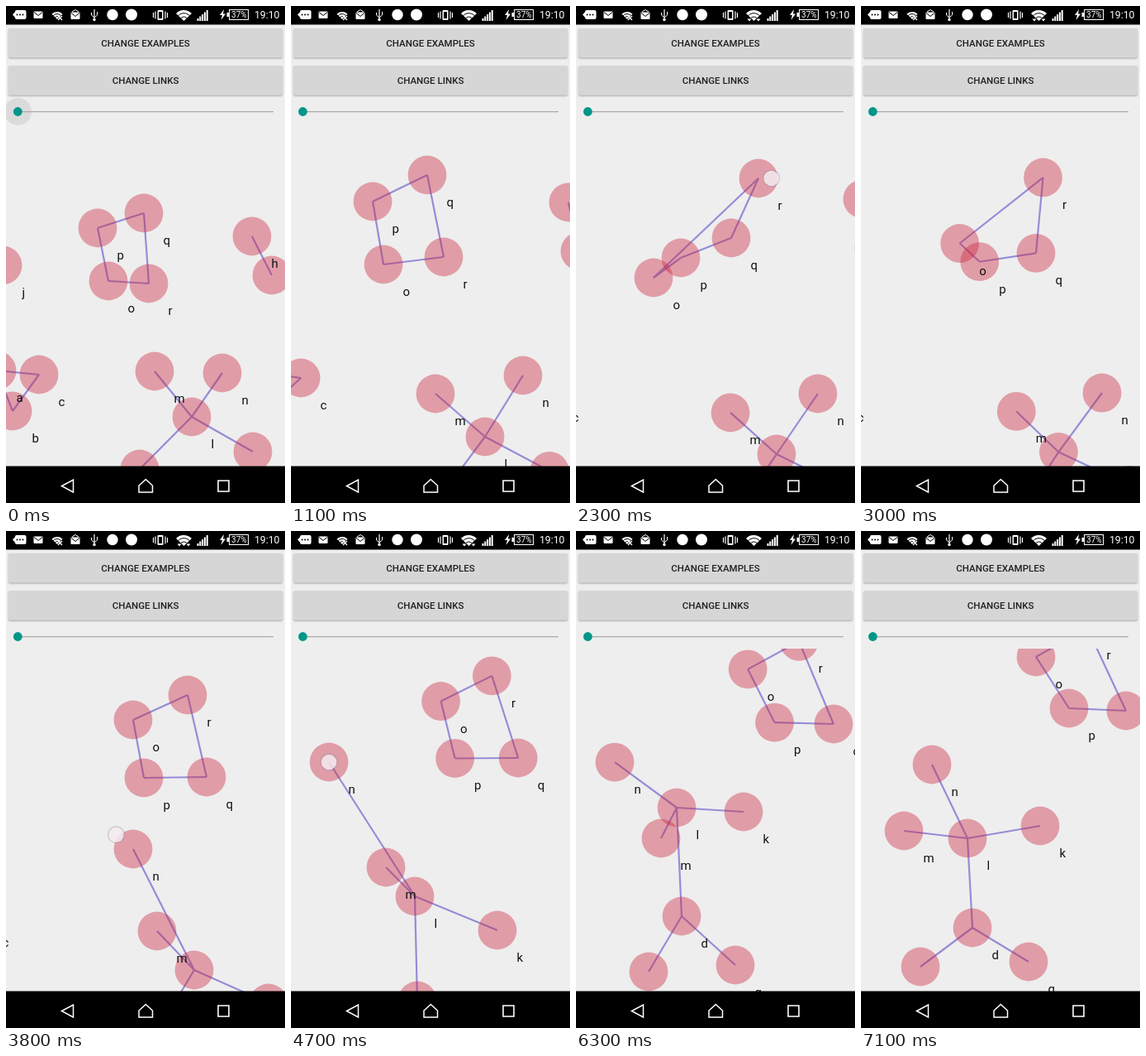
An HTML page with a canvas that plays this animation: 338x600 px, repeating every 7.2 s.

```html
<!DOCTYPE html>
<html lang="en">
<head>
<meta charset="utf-8">
<title>Linked nodes</title>
<style>
html, body { margin: 0; width: 100%; height: 100%; overflow: hidden; background: #eee; }
canvas { display: block; width: 338px; height: 600px; }
</style>
</head>
<body>
<canvas id="stage" width="338" height="600"></canvas>
<script>
const ctx = document.getElementById("stage").getContext("2d");
const LOOP = 7200, STEP = 100, RADIUS = 23.4;

// Smooth motion without overshoot through [time, x, y] keys, at rest outside them.
function path(...keys) {
  const last = keys.length - 1;
  const slope = (i, axis) => (keys[i + 1][axis] - keys[i][axis]) / (keys[i + 1][0] - keys[i][0]);
  const tangent = (i, axis) => {
    if (i === 0 || i === last) return slope(Math.min(i, last - 1), axis);
    const a = slope(i - 1, axis), b = slope(i, axis);
    return a * b > 0 ? 2 * a * b / (a + b) : 0;
  };
  return t => {
    if (t <= keys[0][0]) return keys[0].slice(1);
    if (t >= keys[last][0]) return keys[last].slice(1);
    const i = keys.findIndex(key => key[0] > t) - 1;
    const span = keys[i + 1][0] - keys[i][0];
    const u = (t - keys[i][0]) / span, v = 1 - u;
    return [1, 2].map(axis =>
      v * v * (1 + 2 * u) * keys[i][axis] + u * u * (3 - 2 * u) * keys[i + 1][axis]
      + span * u * v * (v * tangent(i, axis) - u * tangent(i + 1, axis)));
  };
}

// Motion of a part relative to the part that carries it.
const follow = (base, offset) => t => {
  const [x, y] = base(t), [dx, dy] = offset(t);
  return [x + dx, y + dy];
};

// The square drifts as a whole; its corners spread, get pulled over and settle mirrored.
const square = path([0, 144, 296], [1100, 140, 264], [2300, 157, 280], [3800, 196, 255],
  [4700, 225, 232], [6300, 258, 191], [7100, 265, 175]);
const corner = (start, spread, pulled, mirrored, end) => follow(square, path(
  [0, ...start], [1100, ...spread], [2300, ...pulled], [3800, ...mirrored], [7100, ...end]));

// The star is a hub with arms; its lower arm carries two more.
const hub = path([0, 225, 496], [1100, 235, 520], [2300, 243, 541], [3800, 228, 530],
  [4700, 150, 441], [6300, 122, 334], [7100, 129, 371]);
const lower = follow(hub, path([0, -63, 63], [1100, -50, 67], [3800, -42, 70],
  [4700, 3, 126], [6300, 6, 131], [7100, 6, 108]));

const right = path([0, 298, 278], [1100, 336, 237], [2300, 347, 233], [3300, 390, 235]);

const nodes = {
  o: corner([-20, 36], [-28, 48], [-63, 48], [-42, -27], [-53, -23]),
  p: corner([-33, -28], [-41, -28], [-30, 24], [-29, 43], [-13, 39]),
  q: corner([23, -46], [25, -60], [31, 0], [47, 42], [56, 42]),
  r: corner([29, 39], [45, 39], [64, -72], [24, -57], [9, -58]),
  l: hub,
  m: follow(hub, path([0, -45, -55], [1100, -60, -52], [3800, -45, -47],
    [4700, -35, -35], [6300, -19, 37], [7100, -77, -9])),
  k: follow(hub, path([0, 74, 42], [3800, 90, 40], [4700, 100, 41], [6300, 81, 5], [7100, 88, -15])),
  n: path([0, 262, 443], [1100, 281, 446], [2300, 293, 468], [3300, 291, 466],
    [3800, 154, 384], [4000, 46, 279], [6200, 46, 279], [7100, 86, 282]),
  d: lower,
  e: follow(lower, path([6300, -40, 67], [7100, -63, 47])),
  g: follow(lower, path([6300, 65, 59], [7100, 68, 41])),
  a: path([0, -11, 440], [1100, -70, 438]),
  b: path([0, 8, 489], [1100, -38, 495], [2300, -90, 500]),
  c: path([0, 40, 445], [1100, 12, 449], [2300, -28, 464], [4000, -28, 464], [4700, -46, 458]),
  j: path([0, -4, 313], [1100, -50, 310]),
  h: right,
  i: follow(right, path([0, 24, 47], [1100, 14, 59]))
};

const links = ["op", "pq", "qr", "ro", "lm", "ln", "lk", "ld", "de", "dg", "ab", "bc", "ca", "hi"];

// A finger runs slightly ahead of the node it drags.
const LEAD = 40;
const touches = [
  { node: "r", from: 1500, to: 2600, grip: 15 },
  { node: "n", from: 3300, to: 5500, grip: 0 }
];

function disc(x, y, r, color) {
  ctx.fillStyle = color;
  ctx.beginPath();
  ctx.arc(x, y, r, 0, 7);
  ctx.fill();
}

function box(x, y, w, h, color, r = 0) {
  ctx.fillStyle = color;
  ctx.beginPath();
  ctx.roundRect(x, y, w, h, r);
  ctx.fill();
}

function line(points, color, width, closed) {
  ctx.strokeStyle = color;
  ctx.lineWidth = width;
  ctx.beginPath();
  points.forEach(([x, y]) => ctx.lineTo(x, y));
  if (closed) ctx.closePath();
  ctx.stroke();
}

function shape(points, color) {
  ctx.fillStyle = color;
  ctx.beginPath();
  points.forEach(([x, y]) => ctx.lineTo(x, y));
  ctx.fill();
}

function text(value, x, y, font, color, align = "left") {
  ctx.font = font + " Roboto, sans-serif";
  ctx.fillStyle = color;
  ctx.textAlign = align;
  ctx.fillText(value, x, y);
}

function button(label, y) {
  ctx.save();
  ctx.shadowColor = "rgba(0,0,0,.3)";
  ctx.shadowBlur = 2;
  ctx.shadowOffsetY = 1;
  box(3, y, 332, 35.5, "#d6d6d6", 2);
  ctx.restore();
  text(label, 169, y + 22, "500 11.5px", "#202020", "center");
}

function wifi(x, y, r) {
  ctx.fillStyle = "#fff";
  ctx.beginPath();
  ctx.moveTo(x, y);
  ctx.arc(x, y, r, -Math.PI * .76, -Math.PI * .24);
  ctx.fill();
  for (const k of [.38, .72]) {
    ctx.strokeStyle = "#000";
    ctx.lineWidth = 1;
    ctx.beginPath();
    ctx.arc(x, y, r * k, -Math.PI * .8, -Math.PI * .2);
    ctx.stroke();
  }
}

function mail(x, y) {
  box(x - 5.5, y - 4, 11, 8.5, "#fff", 1);
  line([[x - 5, y - 3], [x, y + 1], [x + 5, y - 3]], "#000", 1);
}

function statusBar(t) {
  box(0, 0, 338, 22.5, "#000");
  box(11, 5, 13.5, 11, "#fff", 2);
  shape([[12, 6], [8, 10.5], [12, 15]], "#fff");
  for (const x of [13.5, 17, 20.5]) disc(x, 10.5, 1, "#000");
  mail(39, 10.5);
  wifi(62, 16, 9);
  line([[63, 12], [68, 17]], "#fff", 1.2);
  line([[68, 12], [63, 17]], "#fff", 1.2);
  mail(84, 11.5);
  line([[80, 7], [84, 4.5], [88, 7]], "#fff", 1);
  line([[107, 4], [107, 17]], "#fff", 1.2);
  line([[103.5, 8], [103.5, 11], [107, 14], [110.5, 11], [110.5, 7]], "#fff", 1);
  disc(107, 16.5, 1.7, "#fff");
  disc(129, 10.5, 6.7, "#fff");
  disc(152, 10.5, 7, "#fff");
  box(183.5, 5, 7, 12, "#fff", 1);
  box(185, 7, 4, 8, "#000");
  for (const side of [-1, 1]) {
    line([[187 + side * 6, 6.5], [187 + side * 6, 15.5]], "#fff", 1.2);
    line([[187 + side * 8.5, 8], [187 + side * 8.5, 14]], "#fff", 1.2);
  }
  wifi(215.5, 18, 13);
  if (t >= 1600 && t < 5300) {
    for (const x of [210, 221]) shape([[x - 2.5, 15.5], [x + 2.5, 15.5], [x, 18.5]], "#fff");
  }
  for (let i = 0; i < 5; i++) box(231.5 + i * 2.8, 15 - i * 2.5, 2, 3 + i * 2.5, "#fff");
  shape([[264, 4], [259, 11], [262, 11], [260.5, 17], [266, 9.5], [263, 9.5]], "#fff");
  ctx.strokeStyle = "#fff";
  ctx.lineWidth = 1;
  ctx.strokeRect(270.5, 4.5, 23, 12);
  box(267.5, 8, 3, 5, "#fff");
  text("37%", 282.3, 14.3, "10px", "#fff", "center");
  text("19:10", 331.5, 15, "12.3px", "#fff", "right");
}

function navBar() {
  box(0, 555.5, 338, 45, "#000");
  line([[67.5, 579.5], [81.5, 572], [81.5, 587]], "#fff", 1.5, true);
  line([[161, 579], [169.3, 571.5], [177.5, 579], [177.5, 587], [161, 587]], "#fff", 1.5, true);
  line([[257, 573], [270, 573], [270, 586], [257, 586]], "#fff", 1.6, true);
}

function controls(t) {
  button("CHANGE EXAMPLES", 27);
  button("CHANGE LINKS", 72.3);
  const ripple = Math.max(0, 1 - t / 300);
  if (ripple) disc(14.5, 127.5, 16.5, `rgba(0,0,0,${.08 * ripple})`);
  box(14, 127, 310, 1.2, "#a9a9a9");
  disc(14.3, 127.5, 5.4, "#009688");
}

function graph(t) {
  const at = {};
  for (const name in nodes) at[name] = nodes[name](t);
  ctx.save();
  ctx.beginPath();
  ctx.rect(0, 142, 338, 414);
  ctx.clip();
  for (const [a, b] of links) line([at[a], at[b]], "rgb(150,140,215)", 2.2);
  for (const name in at) disc(...at[name], RADIUS, "rgba(203,35,60,.4)");
  for (const name in at) text(name, at[name][0] + 23.5, at[name][1] + 38, "15px", "#111");
  for (const { node, from, to, grip } of touches) {
    if (t < from || t >= to) continue;
    const [x, y] = nodes[node](t + LEAD);
    disc(x + grip, y, 10.5, "rgba(150,130,165,.4)");
    disc(x + grip, y, 9.3, "rgba(255,248,248,.75)");
  }
  ctx.restore();
}

function draw() {
  const t = Math.floor(performance.now() % LOOP / STEP) * STEP;
  box(0, 0, 338, 600, "#eee");
  graph(t);
  controls(t);
  statusBar(t);
  navBar();
  requestAnimationFrame(draw);
}
draw();
</script>
</body>
</html>
```
